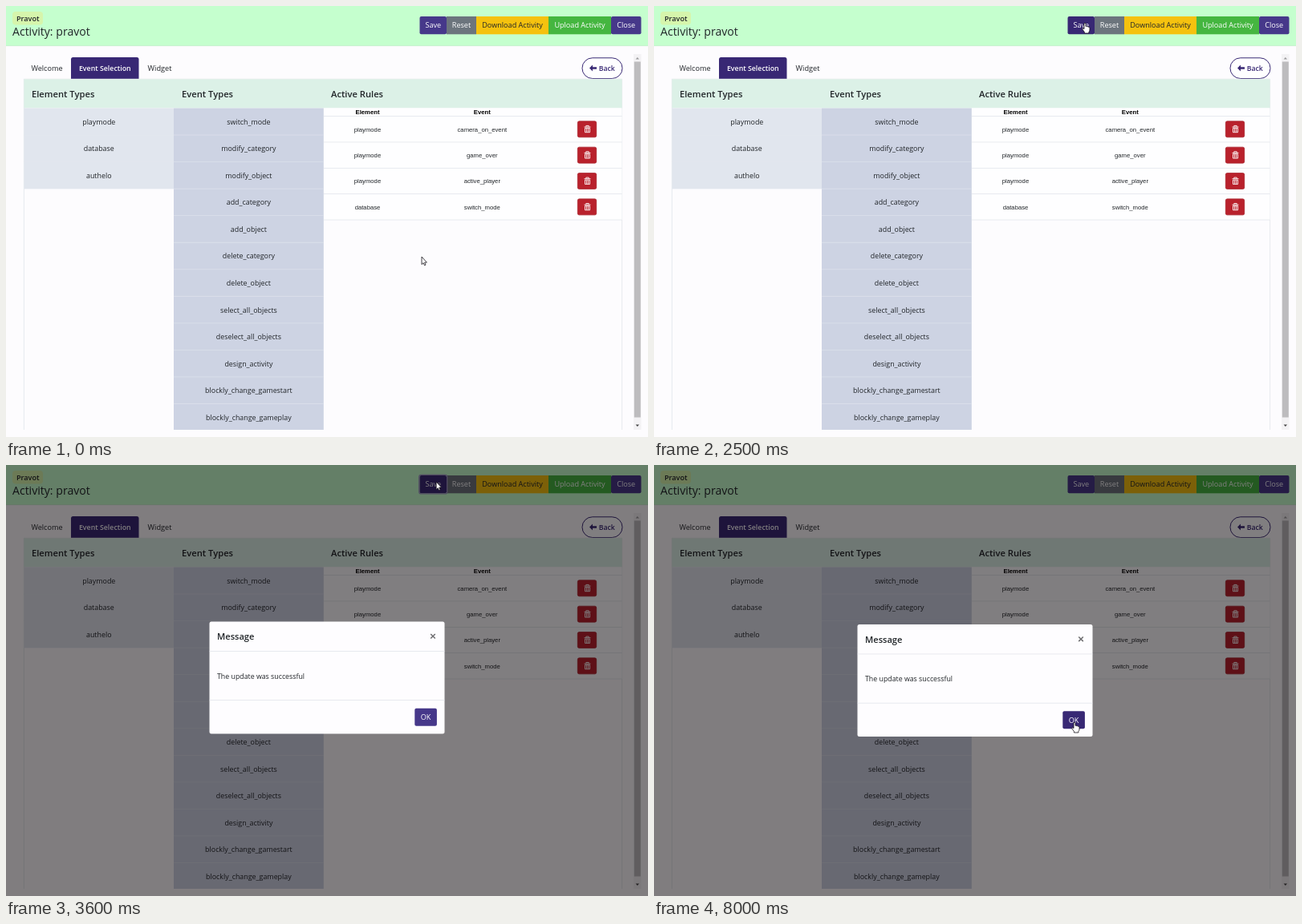
An HTML page for the animation above (8100 ms loop, 800x538 px).

```html
<!DOCTYPE html>
<html lang="en">
<head>
<meta charset="utf-8">
<title>Activity editor</title>
<style>
  html, body { margin: 0; height: 100%; overflow: hidden; background: #fdfcfe; }
  svg { display: block; width: 100vw; height: 100vh; }
  text { font-family: "Open Sans", "Noto Sans", sans-serif; white-space: pre; }
  .table { font-family: "Liberation Sans", Arial, sans-serif; }
</style>
</head>
<body>
<svg id="stage" viewBox="0 0 800 538"></svg>
<script>
const LOOP = 8100, STEP = 100;
const INK = '#212529', PURPLE = '#46388a', DARK_PURPLE = '#382874', LINE = '#dee2e8';
const stage = document.getElementById('stage');

function add(parent, tag, attrs, content) {
  const node = document.createElementNS('http://www.w3.org/2000/svg', tag);
  for (const key in attrs) node.setAttribute(key, attrs[key]);
  if (content) node.textContent = content;
  return parent.appendChild(node);
}
const group = (parent = stage) => add(parent, 'g', {});
const rect = (parent, x, y, width, height, fill, extra) =>
  add(parent, 'rect', { x, y, width, height, fill, ...extra });
const path = (parent, d, extra) => add(parent, 'path', { d, ...extra });
// Text is placed by its vertical middle.
const label = (parent, x, middle, content, size, extra) =>
  add(parent, 'text', { x, y: middle + size * 0.36, 'font-size': size, fill: INK, ...extra }, content);
const CENTER = { 'text-anchor': 'middle' };
const SEMI = { 'font-weight': 600 };

// Top bar
const page = group();
rect(page, 0, 0, 800, 538, '#fdfcfe');
rect(page, 0, 0, 800, 50, '#c5ffce');
rect(page, 0, 49.5, 800, 0.6, '#c9e6d0');
rect(page, 8, 7, 38, 16.5, '#d6f5ac', { rx: 4 });
label(page, 13, 15.5, 'Pravot', 9.1, SEMI);
label(page, 8, 32, 'Activity: pravot', 14.1, { 'font-weight': 500 });

const actions = [
  ['Save', 515.5, 549, PURPLE, '#fff'],
  ['Reset', 549, 586, '#6c757d', '#fff'],
  ['Download Activity', 586, 676, '#f5c20f', INK],
  ['Upload Activity', 676, 754, '#45b640', '#fff'],
  ['Close', 754, 791.5, PURPLE, '#fff']
];
const [saveButton] = actions.map(([name, left, right, color, fill], i) => {
  const button = rect(page, left, 13, right - left, 22.3, color, { rx: i % 4 ? 0 : 2 });
  label(page, (left + right) / 2, 24.2, name, 9.1, { ...CENTER, fill });
  return button;
});
const focusRing = rect(page, 514.8, 12.3, 34.9, 23.6, 'none', { rx: 2.5, stroke: '#9d93c4', 'stroke-width': 1.3 });

// Tabs and back button
path(page, 'M81 91V66.5q0-2.5 2.5-2.5H163q2.5 0 2.5 2.5V91z', { fill: DARK_PURPLE });
label(page, 51, 77.5, 'Welcome', 9.1, { ...CENTER, 'font-weight': 500 });
label(page, 123.3, 77.5, 'Event Selection', 8.8, { ...CENTER, ...SEMI, fill: '#fff' });
label(page, 191.5, 77.5, 'Widget', 9.2, { ...CENTER, 'font-weight': 500 });
rect(page, 718, 64.8, 50, 25.7, '#fefeff', { rx: 12.8, stroke: DARK_PURPLE });
path(page, 'M727 77.5l4-3.9v2.6h5v2.6h-5v2.6z', { fill: DARK_PURPLE });
label(page, 738.8, 77.8, 'Back', 8.7, { ...SEMI, fill: DARK_PURPLE });

// Columns
path(page, 'M22.4 529V91.2H767.6V529', { fill: 'none', stroke: LINE, 'stroke-width': 0.7 });
rect(page, 22.4, 91.4, 745.2, 36, '#dcf1e7');
['Element Types', 'Event Types', 'Active Rules'].forEach((name, i) =>
  label(page, [32, 219, 405][i], 110.3, name, 11.2, SEMI));

const ROW = 33.55;
function column(left, width, color, separator, names) {
  names.forEach((name, i) => {
    const top = 127.5 + i * ROW;
    rect(page, left, top, width, Math.min(ROW + 0.2, 529 - top), color);
    if (i) rect(page, left, top - 0.4, width, 0.7, separator);
    label(page, left + width / 2, top + 17, name, 8.9, CENTER);
  });
}
column(22.5, 186.5, '#e1e6ee', '#e1e6ee', ['playmode', 'database', 'authelo']);
column(209, 186.8, '#cdd3e3', '#dce1eb', [
  'switch_mode', 'modify_category', 'modify_object', 'add_category', 'add_object',
  'delete_category', 'delete_object', 'select_all_objects', 'deselect_all_objects',
  'design_activity', 'blockly_change_gamestart', 'blockly_change_gameplay'
]);

// Rules table
const CELL = { ...CENTER, class: 'table' };
rect(page, 396, 127.5, 371.5, 139.5, '#fefeff');
label(page, 450.5, 132.6, 'Element', 7.7, { ...CELL, 'font-weight': 700, fill: '#000' });
label(page, 593.3, 132.6, 'Event', 7.7, { ...CELL, 'font-weight': 700, fill: '#000' });
rect(page, 396, 137, 371.5, 0.7, LINE);
const rules = [
  ['playmode', 'camera_on_event'], ['playmode', 'game_over'],
  ['playmode', 'active_player'], ['database', 'switch_mode']
];
rules.forEach(([element, event], i) => {
  const y = 153.8 + i * 32.35;
  label(page, 450.5, y + 0.2, element, 7.7, CELL);
  label(page, 593.3, y + 0.2, event, 7.7, CELL);
  rect(page, 396, y + 15.8, 371.5, 0.7, LINE);
  rect(page, 712.3, y - 10, 23.4, 20, '#b9212c', { rx: 2, stroke: '#a51d28', 'stroke-width': 0.7 });
  path(page, `M720.5 ${y - 2.8}h8M722.8 ${y - 3}v-1.4h3.4v1.4M721.5 ${y - 1.4}v5.3h6v-5.3zM723.5 ${y - 1}v4.5M725.5 ${y - 1}v4.5`,
    { fill: 'none', stroke: '#fff', 'stroke-width': 0.9 });
});

// Scrollbar
rect(page, 782, 60, 9.5, 469, '#f3f2f4');
rect(page, 782.8, 69.5, 8, 444, '#bdbcbe');
path(page, 'M784.6 66.5l2.2-2.6 2.2 2.6z', { fill: '#9a999b' });
path(page, 'M784.6 522.5l2.2 2.6 2.2-2.6z', { fill: '#444' });

const backdrop = rect(stage, 0, 0, 800, 538, '#040002');

// Loading notice
const toast = group();
rect(toast, 690, 495, 97, 29.5, '#d9eeee', { rx: 2 });
add(toast, 'circle', { cx: 707, cy: 510, r: 4.7, fill: '#4b5b60' });
label(toast, 714, 510, 'Loading data...', 9, { fill: '#4b5b60' });

// Message dialog
const modal = group();
rect(modal, 253.5, 199, 293, 140, '#fefdff', { rx: 2.5 });
rect(modal, 253.5, 235.6, 293, 0.7, LINE);
rect(modal, 253.5, 296.8, 293, 0.7, LINE);
label(modal, 263, 218, 'Message', 11.1, SEMI);
path(modal, 'M529.2 214.5l5.6 5.6m0-5.6l-5.6 5.6', { stroke: '#706f72', 'stroke-width': 1.5 });
label(modal, 263, 267, 'The update was successful', 8.8);
const okButton = rect(modal, 509.3, 307.3, 27.6, 22, PURPLE, { rx: 2 });
label(modal, 523, 318.6, 'OK', 9.1, { ...CENTER, fill: '#fff' });

// Pointers, with the hot spot at 0,0
const cursor = group();
const POINTER = { fill: '#fff', stroke: '#16141a', 'stroke-width': 0.8, 'stroke-linejoin': 'round' };
const arrow = path(cursor, 'M0 0V9.6L2.1 7.7 3.5 10.8 5 10.1 3.6 7.1H6.4Z', POINTER);
const hand = path(cursor, 'M-1 .8Q0-.6 1 .8V4.4Q2 3.6 2.8 4.8 4 4.2 4.6 5.4 6 5 6 6.6V9Q6 10.5 4.9 11.4V13H-.6V11.5L-3.3 7.8Q-3.4 6.2-1.9 6.8L-1 7.7Z', POINTER);

// time, x, y
const route = [
  [1300, 518, 313], [2300, 537, 21], [4000, 536, 21],
  [5100, 551.5, 292], [5500, 524, 321]
];
const clamp = v => Math.max(0, Math.min(1, v));
const ramp = (t, start, length) => clamp((t - start) / length);

function cursorAt(t) {
  let [, x, y] = route[0];
  for (let i = 1; i < route.length; i++) {
    const [start, x0, y0] = route[i - 1], [end, x1, y1] = route[i];
    if (t < start) break;
    const p = ramp(t, start, end - start), eased = p * p * (3 - 2 * p);
    x = x0 + (x1 - x0) * eased;
    y = y0 + (y1 - y0) * eased;
  }
  return [x, y];
}

function draw(now) {
  const t = Math.floor(now % LOOP / STEP) * STEP;
  const opening = 3390;
  const fade = ramp(t, opening, 150);
  const slide = 29 * (1 - ramp(t, opening, 300)) ** 1.75;
  backdrop.setAttribute('opacity', fade / 2);
  modal.setAttribute('opacity', fade);
  modal.setAttribute('transform', `translate(0 ${-slide})`);
  toast.setAttribute('opacity', Math.min(ramp(t, 2600, 200), 1 - ramp(t, 3380, 200)));

  const [x, y] = cursorAt(t);
  const overSave = t < opening && y < 35 && x > 515;
  const overOk = t > 5100 && y > 307 && x < 537;
  const pointing = overSave || overOk;
  const focused = t >= 2700 && t < 4100;
  cursor.setAttribute('transform', `translate(${x} ${y})`);
  hand.setAttribute('opacity', +pointing);
  arrow.setAttribute('opacity', +!pointing);
  saveButton.setAttribute('fill', overSave || focused ? DARK_PURPLE : PURPLE);
  okButton.setAttribute('fill', overOk ? DARK_PURPLE : PURPLE);
  focusRing.setAttribute('opacity', +focused);
  requestAnimationFrame(() => draw(performance.now()));
}
draw(performance.now());
</script>
</body>
</html>
```
